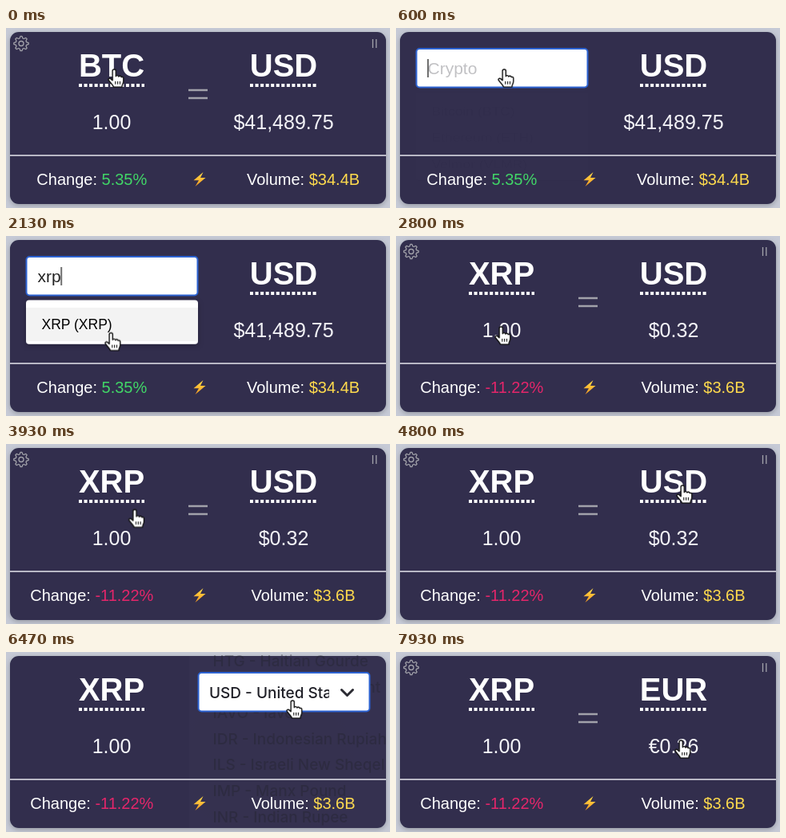
An HTML page that plays this animation: 480x226 px, repeating every 8000 ms.

```html
<!DOCTYPE html>
<html lang="en">
<head>
<meta charset="utf-8">
<title>Currency converter</title>
<style>
html, body { margin: 0; height: 100%; overflow: hidden; background: #c6cad6; }
svg { display: block; width: 100vw; height: 100vh; font-family: "Liberation Sans", Arial, sans-serif; fill: #fff; }
.code { font-size: 40px; font-weight: bold; text-anchor: middle; }
.value { font-size: 25px; text-anchor: middle; fill: #f4f4f8; }
.stat { font-size: 20px; text-anchor: middle; }
.ui { font: 500 19px Inter, sans-serif; fill: #202028; }
.option { font-size: 17.5px; fill: #333; }
.option text:first-of-type { fill: #000; }
.grey { fill: none; stroke: #a2a2aa; }
.dots { stroke: #fff; stroke-width: 4; stroke-dasharray: 4 2.55; }
.box { stroke: #2c63d2; stroke-width: 2; }
.up { fill: #41d667; } .down { fill: #e4266a; } .gold { fill: #ffdb4d; }

/* one loop is 8000 ms, so 1% is 80 ms */
.cut { animation: 8s step-end infinite; }
.move { animation: 8s linear infinite; }

@keyframes chrome { 0% { opacity: 1 } 1.625% { opacity: 0 } 29.125% { opacity: 1 } 60.875% { opacity: 0 } 81.625%, 100% { opacity: 1 } }
@keyframes amount { 0% { opacity: 1 } 1.625% { opacity: 0 } 29.125%, 100% { opacity: 1 } }
@keyframes btc { 0% { opacity: 1 } 1.625%, 100% { opacity: 0 } }
@keyframes xrp { 0% { opacity: 0 } 29.125%, 100% { opacity: 1 } }
@keyframes usd { 0% { opacity: 1 } 60.875%, 100% { opacity: 0 } }
@keyframes eur { 0% { opacity: 0 } 81.625%, 100% { opacity: 1 } }
@keyframes before { 0% { opacity: 1 } 32.5%, 100% { opacity: 0 } }
@keyframes after { 0% { opacity: 0 } 32.5%, 100% { opacity: 1 } }
@keyframes dollars { 0% { opacity: 0 } 32.5% { opacity: 1 } 60.875%, 100% { opacity: 0 } }
@keyframes euros { 0% { opacity: 0 } 82.5%, 100% { opacity: 1 } }
@keyframes search { 0% { opacity: 0 } 1.625% { opacity: 1 } 29.125%, 100% { opacity: 0 } }
@keyframes select { 0% { opacity: 0 } 60.875% { opacity: 1 } 81.625%, 100% { opacity: 0 } }

@keyframes hint { 0% { opacity: 1 } 19.125%, 100% { opacity: 0 } }
@keyframes key1 { 0% { fill-opacity: 0 } 19.125%, 100% { fill-opacity: 1 } }
@keyframes key2 { 0% { fill-opacity: 0 } 21.625%, 100% { fill-opacity: 1 } }
@keyframes key3 { 0% { fill-opacity: 0 } 24.125%, 100% { fill-opacity: 1 } }
@keyframes caret {
  0% { transform: none } 19.125% { transform: translateX(10.5px) }
  21.625% { transform: translateX(17.5px) } 24.125%, 100% { transform: translateX(29.2px) }
}
@keyframes drop {
  0%, 7.5% { opacity: 0; transform: scaleY(.8); animation-timing-function: ease-out }
  10%, 100% { opacity: 1; transform: none }
}
@keyframes found { 0% { opacity: 0 } 19.125% { opacity: 1 } 21.625%, 100% { opacity: 0 } }
@keyframes match { 0% { opacity: 0 } 21.625%, 100% { opacity: 1 } }

/* the panel clears faster than its rows, and hides the select while open */
@keyframes panel {
  0%, 61.62% { opacity: 0 } 61.625%, 79.125% { opacity: 1 } 80% { opacity: .4 }
  80.875% { opacity: .02 } 81.625%, 100% { opacity: 0 }
}
@keyframes rows {
  0%, 61.62% { opacity: 0 } 61.625%, 79.125% { opacity: 1 } 80% { opacity: .6 }
  80.875% { opacity: .35 } 81.625%, 100% { opacity: 0 }
}
@keyframes covered {
  0%, 61.62% { opacity: 1 } 61.625%, 79.125% { opacity: 0 }
  80% { opacity: .5 } 80.875%, 100% { opacity: 1 }
}
@keyframes scroll {
  0%, 63.4% { transform: translateY(var(--start)); animation-timing-function: ease-in-out }
  67.5%, 70% { transform: translateY(-180px); animation-timing-function: ease-out }
  72.5%, 100% { transform: none }
}
@keyframes hand {
  0%, 9.125% { transform: translate(137px, 63px); animation-timing-function: ease-in-out }
  15%, 25% { transform: translate(133px, 140px) }
  28.375%, 39.125% { transform: translate(133px, 125px) }
  40.875%, 46.625% { transform: translate(133px, 98px); animation-timing-function: ease-in-out }
  56.625%, 60.875% { transform: translate(360px, 63px) }
  62.5%, 95.875% { transform: translate(360px, 72px); animation-timing-function: ease-out }
  99.125%, 100% { transform: translate(358px, 122px) }
}
</style>
</head>
<body>
<svg viewBox="0 0 480 226" preserveAspectRatio="none">
  <defs>
    <radialGradient id="glass" cx=".36" cy=".58" r=".62">
      <stop stop-color="#bcbdd0"/><stop offset=".45" stop-color="#c1c2d3"/>
      <stop offset="1" stop-color="#d0d2db"/>
    </radialGradient>
    <linearGradient id="spark" x2="0" y2="1">
      <stop stop-color="#ffdc4a"/><stop offset="1" stop-color="#f89a20"/>
    </linearGradient>
    <filter id="shade" x="-20%" y="-20%" width="140%" height="140%">
      <feDropShadow dx="0" dy="2" stdDeviation="3" flood-opacity=".25"/>
    </filter>
    <clipPath id="field"><rect x="250" y="30" width="154" height="40"/></clipPath>
  </defs>

  <rect width="480" height="226" fill="#c6cad6"/>
  <rect x="5" y="5" width="470" height="216" rx="11" fill="#302f4d" filter="url(#shade)"/>
  <path d="M5 160H475" stroke="#e6e6ee" stroke-width="1.6"/>

  <g class="cut" style="animation-name: chrome">
    <g class="grey" stroke-width="1.3">
      <path id="gear" transform="translate(19 19.5)" stroke-linejoin="round"/>
      <circle cx="19" cy="19.5" r="3"/>
      <path d="M458.5 14V25M462.8 14V25"/>
    </g>
    <path class="grey" d="M228 78H252M228 88H252" stroke-width="2.4"/>
  </g>

  <g class="cut" style="animation-name: btc">
    <text class="code" x="132" y="61.2">BTC</text><path class="dots" d="M91 72H173"/>
  </g>
  <g class="cut" style="animation-name: xrp">
    <text class="code" x="132" y="61.2">XRP</text><path class="dots" d="M91 72H173"/>
  </g>
  <g class="cut" style="animation-name: usd">
    <text class="code" x="347" y="61.2">USD</text><path class="dots" d="M305 72H388"/>
  </g>
  <g class="cut" style="animation-name: eur">
    <text class="code" x="347" y="61.2">EUR</text><path class="dots" d="M305 72H388"/>
  </g>

  <text class="value cut" x="132" y="127" style="animation-name: amount">1.00</text>
  <text class="value cut" x="347" y="127" style="animation-name: before">$41,489.75</text>
  <text class="value cut" x="347" y="127" style="animation-name: dollars">$0.32</text>
  <text class="value cut" x="347" y="127" style="animation-name: euros">€0.26</text>

  <g class="stat cut" style="animation-name: before">
    <text x="107.3" y="197">Change: <tspan class="up">5.35%</tspan></text>
    <text x="371.5" y="197">Volume: <tspan class="gold">$34.4B</tspan></text>
  </g>
  <g class="stat cut" style="animation-name: after">
    <text x="107.3" y="197">Change: <tspan class="down">-11.22%</tspan></text>
    <text x="371.5" y="197">Volume: <tspan class="gold">$3.6B</tspan></text>
  </g>
  <path d="M246.5 181L234.5 191.2H241L236.5 199L249.5 188H243Z" fill="url(#spark)"/>

  <g class="cut" style="animation-name: search">
    <rect class="box" x="25.5" y="26" width="214" height="48.5" rx="4"/>
    <text class="cut" x="39.5" y="58" font-size="21" fill="#c1c1c4" style="animation-name: hint">Crypto</text>
    <text x="39.5" y="58" font-size="21" fill="#222"><tspan class="cut" style="animation-name: key1">x</tspan><tspan class="cut" style="animation-name: key2">r</tspan><tspan class="cut" style="animation-name: key3">p</tspan></text>
    <path class="cut" d="M40 39V62" stroke="#222" stroke-width="1.3" style="animation-name: caret"/>
    <g class="move" style="animation-name: drop; transform-origin: 25px 80px">
      <g class="option cut" style="animation-name: hint" data-rows="Bitcoin (BTC),Ethereum (ETH),Velmor (VLMR)"></g>
      <g class="option cut" style="animation-name: found" data-rows="XRP (XRP),Monero (XMR),Tezos (XTZ)"></g>
      <g class="option cut" style="animation-name: match" data-rows="XRP (XRP)"></g>
    </g>
  </g>

  <g class="move" style="animation-name: panel">
    <rect x="229" y="-10" width="270" height="250" fill="url(#glass)" filter="url(#shade)"/>
  </g>
  <g class="move" style="animation-name: rows">
    <g id="list" class="ui move" style="animation-name: scroll"></g>
  </g>

  <g class="cut" style="animation-name: select">
    <g class="move" style="animation-name: covered">
      <rect class="box" x="240.5" y="26" width="214" height="48.5" rx="4"/>
      <text class="ui" x="254" y="57.5" clip-path="url(#field)">USD - United States Dollar</text>
      <path d="M419.5 47.5L426.5 54.5L433.5 47.5" fill="none" stroke="#2b2b33" stroke-width="3" stroke-linecap="round" stroke-linejoin="round"/>
    </g>
  </g>

  <g class="move" style="animation-name: hand">
    <g transform="scale(1.1)" stroke="#111" stroke-width="1.3" stroke-linejoin="round">
      <path d="M-3.5 2.5V-8.2a1.9 1.9 0 0 1 3.8 0v6a1.7 1.7 0 0 1 3.2.4 1.6 1.6 0 0 1 3 .6 1.5 1.5 0 0 1 2.4 1.2v3.5c0 2.5-1.5 3.5-1.7 6.5H-2.3c-.5-2-3.5-5-5.4-7.3-1.3-1.7.6-3.2 2-2.2z"/>
      <path d="M-.2 3.5V7M2.4 3.5V7M5 3.5V7" stroke-width="1"/>
    </g>
  </g>
</svg>

<script>
const NS = 'http://www.w3.org/2000/svg';
const add = (parent, tag, attrs, text = '') => {
  const el = document.createElementNS(NS, tag);
  for (const key in attrs) el.setAttribute(key, attrs[key]);
  el.textContent = text;
  parent.append(el);
};

for (const menu of document.querySelectorAll('[data-rows]')) {
  const rows = menu.dataset.rows.split(',');
  const height = rows.length * 41.3 + 14;
  add(menu, 'rect', { x: 25, y: 80.5, width: 215, height, rx: 4, fill: '#fff', filter: 'url(#shade)' });
  add(menu, 'rect', { x: 25, y: 90, width: 215, height: 42, fill: '#f3f3f3' });
  rows.forEach((row, i) => add(menu, 'text', { x: 44.5, y: 117 + i * 41.4 }, row));
}

const currencies = `HTG - Haitian Gourde,HUF - Hungarian Forint,IAVO - Iavo,IDR - Indonesian Rupiah,
ILS - Israeli New Sheqel,IMP - Manx Pound,INR - Indian Rupee,IQD - Iraqi Dinar,IRR - Iranian Rial,
ISK - Icelandic Króna,JEP - Jersey Pound,JMD - Jamaican Dollar,JOD - Jordanian Dinar,JPY - Japanese Yen,
KES - Kenyan Shilling,KGS - Kyrgystani Som,KHR - Cambodian Riel,KMF - Comorian Franc,
KRW - South Korean Won,KWD - Kuwaiti Dinar,LAK - Laotian Kip,LBP - Lebanese Pound,
LKR - Sri Lankan Rupee,LYD - Libyan Dinar,MAD - Moroccan Dirham,MXN - Mexican Peso,
NOK - Norwegian Krone,NZD - New Zealand Dollar,PHP - Philippine Peso,PLN - Polish Zloty,
SEK - Swedish Krona,THB - Thai Baht,TRY - Turkish Lira,UAH - Ukrainian Hryvnia,
UGX - Ugandan Shilling,USD - United States Dollar,UYU - Uruguayan Peso,UZS - Uzbekistan Som,
VND - Vietnamese Dong,XAF - CFA Franc BEAC,ZAR - South African Rand`.split(/,\s*/);
const list = document.getElementById('list');
const pitch = 32.6;
currencies.forEach((name, i) => add(list, 'text', { x: 258.5, y: 18 + i * pitch }, name));
const chosen = currencies.findIndex(name => name.startsWith('USD'));
list.style.setProperty('--start', `${39 - chosen * pitch}px`);

const teeth = 8;
const points = Array.from({ length: teeth * 4 }, (_, i) => {
  const angle = (i - 0.5) / (teeth * 4) * 2 * Math.PI;
  const radius = i % 4 < 2 ? 9.2 : 6.8;
  return `${(radius * Math.cos(angle)).toFixed(2)} ${(radius * Math.sin(angle)).toFixed(2)}`;
});
document.getElementById('gear').setAttribute('d', `M${points.join('L')}Z`);
</script>
</body>
</html>
```
